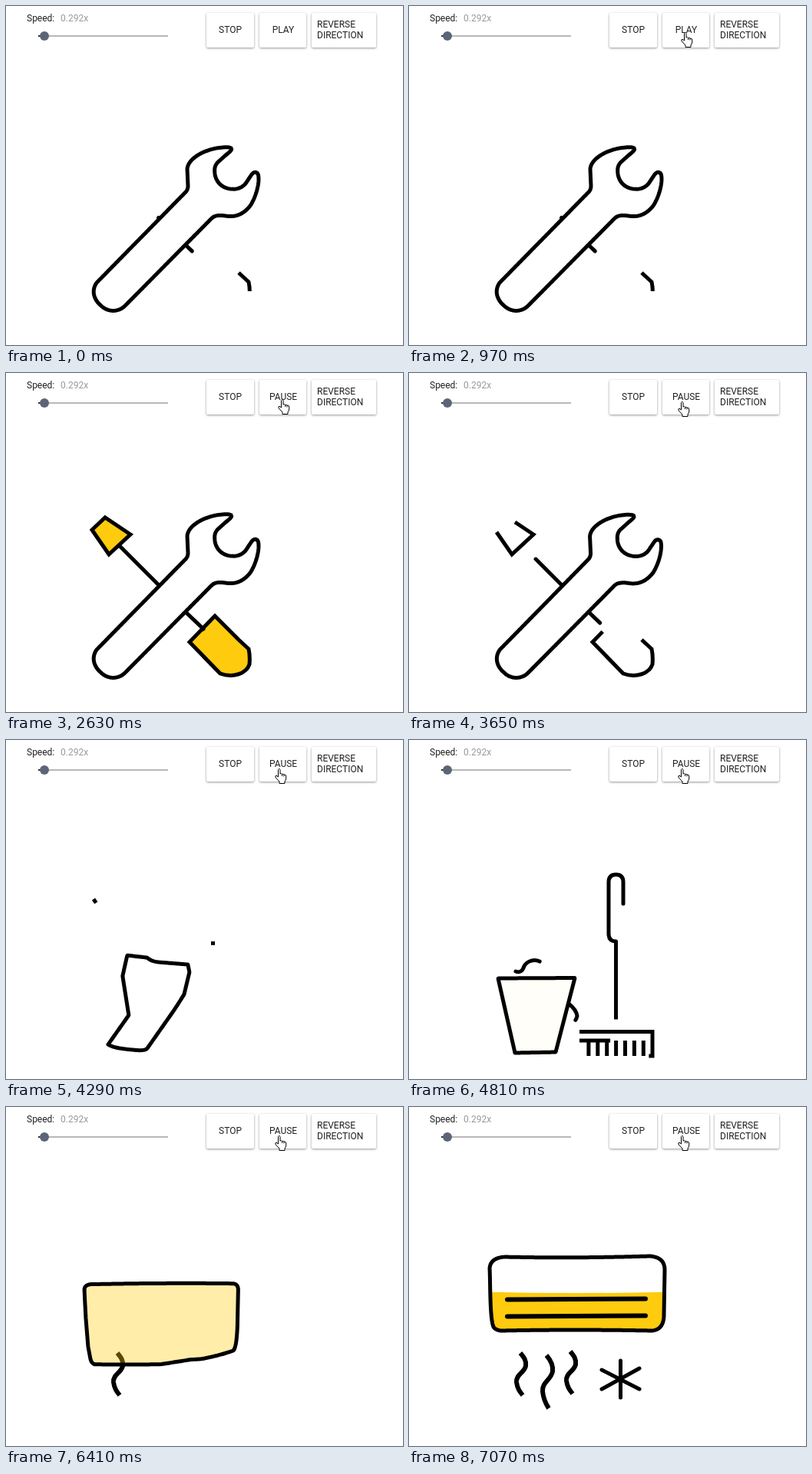
Write an HTML page that moves like this. It is 517x441 px and loops after 8 s.

```html
<!DOCTYPE html>
<html lang="en">
<head>
<meta charset="utf-8">
<style>
  html, body { margin: 0; width: 100%; height: 100%; overflow: hidden; background: #fff; }
  svg { display: block; width: 517px; height: 441px; }
  text { font: 12px Roboto, sans-serif; fill: #212121; }
  .mid { text-anchor: middle; }
  .button { fill: #fff; filter: drop-shadow(0 1px 1.5px rgba(0, 0, 0, .42)); }
  .ink { fill: none; stroke: #000; stroke-width: 5; stroke-linecap: round; stroke-linejoin: round; }
  .flat { stroke-linecap: butt; stroke-linejoin: miter; }
  .wide { stroke-width: 6; }
  .paint { fill: #fecb0e; }
</style>
</head>
<body>
<svg viewBox="0 0 517 441">
  <clipPath id="inside"><path id="mask"/></clipPath>
  <text x="27" y="20">Speed:</text>
  <text x="71" y="20" style="fill:#999">0.292x</text>
  <path d="M42 39H211" stroke="#b8b8b8" stroke-width="2"/>
  <path d="M42 39H46" stroke="#333" stroke-width="2"/>
  <circle cx="50" cy="39" r="6" fill="#5c6577"/>
  <rect class="button" x="261" y="9" width="62" height="45" rx="2"/>
  <rect class="button" x="330" y="9" width="61" height="45" rx="2"/>
  <rect class="button" x="398" y="9" width="84" height="45" rx="2"/>
  <text class="mid" x="292" y="35">STOP</text>
  <text class="mid" x="361" y="35" id="toggle">PLAY</text>
  <text x="405" y="28">REVERSE</text>
  <text x="405" y="42">DIRECTION</text>
  <g id="under"></g>
  <path id="fill" class="paint" clip-path="url(#inside)"/>
  <path id="body" class="ink"/>
  <g id="over"></g>
  <path id="hand" fill="#fff" stroke="#000" stroke-linejoin="round"
    d="M4.5 12V2.5Q5.7 0 7 2.5V8Q8.5 6.8 9.6 8.5Q11 7.7 12 9.2Q14.7 8.7 14.7 11V15L13 18V20.5H6V18L1.3 13Q0 10.4 2 10.2ZM9.6 8.5V11M12 9.2V11.5"/>
</svg>
<script>
const LOOP = 8000, SAMPLES = 320;
const $ = id => document.getElementById(id);

function addPath(parent, className, d) {
  const path = document.createElementNS('http://www.w3.org/2000/svg', 'path');
  path.setAttribute('d', d);
  path.setAttribute('class', className);
  if (parent) parent.append(path);
  return path;
}

// Piecewise linear value; keys are time, value, time, value...
function track(t, keys) {
  if (t <= keys[0]) return keys[1];
  for (let i = 2; i < keys.length; i += 2) {
    if (t < keys[i]) {
      const p = (t - keys[i - 2]) / (keys[i] - keys[i - 2]);
      return keys[i - 1] + (keys[i + 1] - keys[i - 1]) * p;
    }
  }
  return keys[keys.length - 1];
}

function sample(d) {
  const path = addPath(null, '', d), length = path.getTotalLength();
  return Array.from({ length: SAMPLES }, (_, i) => {
    const { x, y } = path.getPointAtLength(length * i / SAMPLES);
    return [x, y];
  });
}

// Outlines run clockwise from the lower left corner.
const wrench = sample('M118 360L234 242Q237 239 237 234L236 212C237 196 267 182 291 184Q296 185 292 189L276 203C270 209 272 216 272 219C274 230 282 237 293 238C303 239 310 235 314 228L320 219Q324 214 328 218C331 226 327 246 318 260C308 272 298 275 286 273Q273 271 268 276L155 390C146 399 132 398 124 390C114 382 111 370 118 360Z');
const bending = sample('M133 396L160 358L152 307L158 280L184 283Q189 288 200 289L237 292L239 302L232 331Q222 347 215 357L184 401Q181 405 165 403Q140 401 133 396Z');
const cup = sample('M138 407L116 310L216 309.500L191 406Z');
const widening = sample('M110 328L107 312L104 275L102 238Q102 232 110 231Q200 229 296 230Q302 231 302 238L301 285Q300 312 296 317Q280 323 255 328L240 329L202 335Q150 336 115 335Q111 333 110 328Z');
const cooler = sample('M110 286C105 275 106 225 105 210Q106 196 125 195Q215 197 313 194Q333 195 333 212L332 270Q332 290 316 291Q215 289 120 291Q112 290 110 286Z');
const stretched = cooler.map(([x, y]) => [219 + (x - 219) * 1.08, 243 + (y - 243) * 1.08]);

const easeIn = p => p * p, easeOut = p => p * (2 - p), easeBoth = p => p * p * (3 - 2 * p);
const poses = [
  [0, wrench], [3600, wrench], [4290, bending, easeIn], [4720, cup, easeOut],
  [6130, cup], [6410, widening, easeIn], [6630, stretched, easeOut], [6850, cooler, easeBoth],
];

function outline(t) {
  const next = poses.findIndex(pose => pose[0] > t);
  let points = cooler;
  if (next > 0) {
    const [start, from] = poses[next - 1], [end, to, ease = easeBoth] = poses[next];
    const p = ease((t - start) / (end - start));
    points = from.map(([x, y], i) => [x + (to[i][0] - x) * p, y + (to[i][1] - y) * p]);
  }
  return 'M' + points.map(([x, y]) => x.toFixed(2) + ' ' + y.toFixed(2)).join('L') + 'Z';
}

const tip = 'M114 207L134 236L162 210L129 188L112 204Z';
const grip = 'M303 347L316 359Q318 368 317 379C313 391 296 397 279 391L239 350L272 316Z';
const paints = [tip, grip].map(d => addPath($('under'), 'paint', d));
const paintKeys = [1900, 0, 2500, 1, 2950, 1, 3400, 0];

const strokes = [];
function draw(layer, className, d, ...keys) {
  const path = addPath($(layer), 'ink ' + className, d);
  path.setAttribute('pathLength', 1);
  strokes.push({ path, keys });
}

// Screwdriver
draw('under', 'flat', tip, 1400, 0, 2000, 1, 3400, 1, 4330, 0);
draw('under', '', 'M199 276L148 225', 1320, .01, 1800, 1, 3400, 1, 4150, 0);
draw('under', '', 'M234 311L257 333', 1320, .36, 1700, 1, 3400, 1, 4100, 0);
draw('under', 'flat', grip, 1320, .13, 2050, 1, 3400, 1, 4200, 0);

// Mop and cup details
const mopOut = [5720, 1, 6200, 0];
const teeth = Array.from({ length: 7 }, (_, i) => `M${233.900 + i * 11.900} 391V411`).join('');
draw('under', 'flat', 'M269.500 262V380', 4265, 0, 4900, 1, ...mopOut);
draw('under', '', 'M269.500 262Q260 262 260 252V185Q260 175 269.500 175Q279 175 279 185V252Q279 262 269.500 262Z', 4320, 0, 5000, 1, ...mopOut);
draw('under', 'flat', 'M222 379.500H317V411H222Z', 4500, 0, 5100, 1, ...mopOut);
draw('under', 'flat', 'M222 391H317', 4600, 0, 5100, 1, ...mopOut);
draw('under', 'flat', teeth, 4700, 0, 5200, 1, ...mopOut);
draw('under', '', 'M139 301Q147 304 150 294C156 284 170 285 175 292C179 302 184 304 191 300Q202 299 211 307', 4550, 0, 5150, 1, ...mopOut);
draw('under', '', 'M208 343Q218 351 219 359Q216 371 201 375', 4500, 0, 5050, 1, ...mopOut);

// Air conditioner
const wave = 'c5 6 8 10 7 17c-2 9 -13 11 -12 21c1 8 4 12 8 17';
draw('under', 'flat wide', 'M145 320' + wave, 6270, 0, 6400, 1);
draw('under', 'flat wide', 'M179 323c6 7 9 13 8 21c-2 11 -14 14 -13 26c1 10 4 16 8 22', 6420, 0, 6580, 1);
draw('under', 'flat wide', 'M210 318' + wave, 6480, 0, 6660, 1);
draw('under', '', 'M275.500 330V378', 6560, 0, 6760, 1);
draw('under', '', 'M251 342L300 367', 6620, 0, 6820, 1);
draw('under', '', 'M300 340L251 367', 6680, 0, 6880, 1);
draw('over', 'wide', 'M128 250.500L308 249.500', 6600, 0, 6850, 1);
draw('over', 'wide', 'M128 272.500L308 271.500', 6660, 0, 6900, 1);

function render(t) {
  const d = outline(t);
  $('body').setAttribute('d', d);
  $('mask').setAttribute('d', d);

  const level = track(t, [6410, 220, 6680, 239.5]);
  const top = t < 6400 ? 150 : level;
  $('fill').setAttribute('d', `M60 ${top}Q219 ${top + 5} 380 ${top}V441H60Z`);
  $('fill').style.opacity = track(t, [4800, 0, 5200, 1, 5500, 1, 5630, .73, 5980, 0, 6290, 0, 6410, .35, 6640, 1]);
  for (const paint of paints) paint.style.opacity = track(t, paintKeys);

  for (const { path, keys } of strokes) {
    const part = track(t, keys);
    path.style.visibility = part > 0 ? 'visible' : 'hidden';
    path.style.strokeDasharray = part < 1 ? `${part} 2` : 'none';
  }

  $('toggle').textContent = t < 1320 ? 'PLAY' : 'PAUSE';
  const p = easeBoth(track(t, [190, 0, 960, 1])), nudge = track(t, [2680, 0, 2880, 1]);
  const x = 480 - 126 * p - 4 * nudge, y = 445 - 412 * p + 3 * nudge;
  $('hand').setAttribute('transform', `translate(${x} ${y})`);
}

const begin = performance.now();
function tick() {
  render((performance.now() - begin) % LOOP);
  requestAnimationFrame(tick);
}
tick();
</script>
</body>
</html>
```
